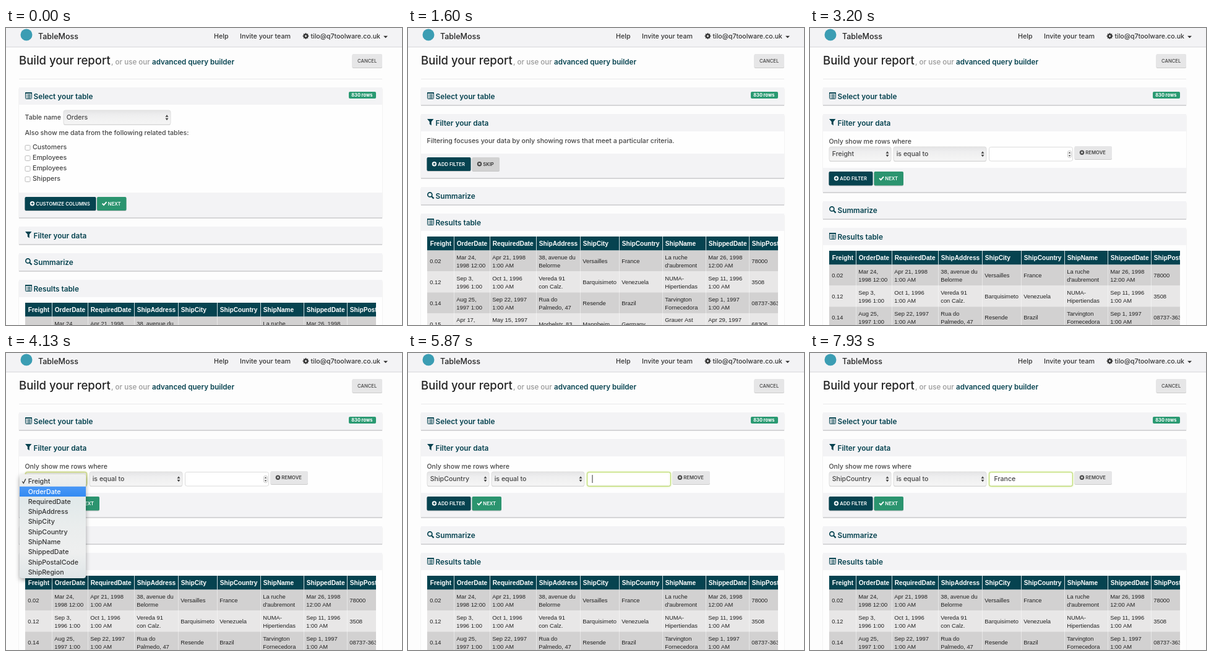
An HTML page with a canvas that plays this animation: 640 by 480 pixels, repeating every 8 s.

```html
<!DOCTYPE html>
<html lang="en">
<head>
<meta charset="utf-8">
<title>Report builder</title>
<style>
  html, body { margin: 0; width: 100%; height: 100%; overflow: hidden; background: #fdfdfd; }
  canvas { display: block; width: 640px; height: 480px; }
</style>
</head>
<body>
<canvas id="stage" width="640" height="480"></canvas>
<script>
const ctx = document.getElementById('stage').getContext('2d');
const LOOP = 8000;
const NAVY = '#064350', GREEN = '#2b946f', INK = '#444', PANEL = '#f3f3f5', WHITE = '#fefefe';
const UI = 'Inter, sans-serif', TABLE = '"Liberation Sans", Arial, sans-serif';

// Timeline in ms
const COLLAPSE = 700, COLLAPSE_TIME = 350, ADD_FILTER = 2880;
const MENU_OPEN = 3680, MENU_CLOSE = 4790, MENU_FADE = 230, PICKED = 5040;
const HOVERS = [4050, 4230, 4330, 4430, 4530];
const INPUT_FOCUS = 5600, TYPE_START = 6300, TYPE_STEP = 170, ANSWER = 'France';

const FIELDS = ['Freight', 'OrderDate', 'RequiredDate', 'ShipAddress', 'ShipCity', 'ShipCountry',
  'ShipName', 'ShippedDate', 'ShipPostalCode', 'ShipRegion'];
const COLUMNS = [31, 74, 132, 207, 278, 341, 411, 481, 551];
const ROWS = [
  ['0.02', 'Mar 24,|1998 12:00', 'Apr 21, 1998|1:00 AM', '38, avenue du|Belorme', 'Versailles', 'France',
    'La ruche|d\'aubremont', 'Mar 26, 1998|12:00 AM', '78000'],
  ['0.12', 'Sep 3,|1996 1:00', 'Oct 1, 1996|1:00 AM', 'Vereda 91|con Calz.', 'Barquisimeto', 'Venezuela',
    'NUMA-|Hipertiendas', 'Sep 11, 1996|1:00 AM', '3508'],
  ['0.14', 'Aug 25,|1997 1:00', 'Sep 22, 1997|1:00 AM', 'Rua do|Palmedo, 47', 'Resende', 'Brazil',
    'Tarvington|Fornecedora', 'Sep 1, 1997|1:00 AM', '08737-363'],
  ['0.15', 'Apr 17,|1997 1:00', 'May 15, 1997|1:00 AM', 'Morbelstr. 83', 'Mannheim', 'Germany',
    'Grauer Ast|Feinkost', 'Apr 29, 1997|1:00 AM', '68306']
];

function text(str, x, y, size = 10.6, color = INK, weight = 500, family = UI) {
  ctx.font = `${weight} ${size}px ${family}`;
  ctx.fillStyle = color;
  ctx.fillText(str, x, y);
}

function rect(x, y, w, h, color) {
  ctx.fillStyle = color;
  ctx.fillRect(x, y, w, h);
}

function box(x, y, w, h, r, fill, stroke) {
  ctx.beginPath();
  ctx.roundRect(x, y, w, h, r);
  if (fill) { ctx.fillStyle = fill; ctx.fill(); }
  if (stroke) { ctx.strokeStyle = stroke; ctx.lineWidth = 1; ctx.stroke(); }
}

function poly(points, color, lineWidth) {
  ctx.beginPath();
  points.forEach(([x, y]) => ctx.lineTo(x, y));
  if (lineWidth) {
    ctx.strokeStyle = color; ctx.lineWidth = lineWidth; ctx.stroke();
  } else {
    ctx.fillStyle = color; ctx.fill();
  }
}

function disc(x, y, r, color) {
  ctx.beginPath();
  ctx.arc(x, y, r, 0, 7);
  ctx.fillStyle = color;
  ctx.fill();
}

function verticalShade(y, h, colors) {
  const shade = ctx.createLinearGradient(0, y, 0, y + h);
  colors.forEach((color, i) => shade.addColorStop(i / (colors.length - 1), color));
  return shade;
}

function clipped(x, y, w, h, paint) {
  ctx.save();
  ctx.beginPath();
  ctx.rect(x, y, w, h);
  ctx.clip();
  paint();
  ctx.restore();
}

const icons = {
  list(x, y) {
    box(x + .5, y + .5, 10, 10, 1, null, NAVY);
    rect(x, y, 11, 2, NAVY);
    for (let i = 0; i < 3; i++) {
      rect(x + 2, y + 3.4 + i * 2.3, 1.2, 1.2, NAVY);
      rect(x + 4, y + 3.4 + i * 2.3, 5, 1.2, NAVY);
    }
  },
  funnel(x, y) {
    poly([[x, y], [x + 10.5, y], [x + 6.8, y + 4.6], [x + 6.8, y + 10.5], [x + 3.8, y + 8.3], [x + 3.8, y + 4.6]], NAVY);
  },
  search(x, y) {
    ctx.beginPath();
    ctx.arc(x + 4.4, y + 4.4, 3.5, 0, 7);
    ctx.strokeStyle = NAVY; ctx.lineWidth = 1.7; ctx.stroke();
    poly([[x + 7, y + 7], [x + 10.6, y + 10.6]], NAVY, 2.2);
  },
  cross(x, y, ink, hole, turn) {
    disc(x, y, 3.7, ink);
    ctx.save();
    ctx.translate(x, y);
    ctx.rotate(turn);
    rect(-2.1, -.6, 4.2, 1.2, hole);
    rect(-.6, -2.1, 1.2, 4.2, hole);
    ctx.restore();
  },
  plus(x, y) { icons.cross(x, y, '#fff', NAVY, 0); },
  times(x, y) { icons.cross(x, y, INK, '#ddd', Math.PI / 4); },
  check(x, y) { poly([[x - 3.4, y], [x - 1, y + 2.4], [x + 3.5, y - 2.5]], '#fff', 1.9); },
  gear(x, y) {
    ctx.save();
    ctx.translate(x, y);
    for (let i = 0; i < 4; i++) { rect(-1, -4.8, 2, 9.6, '#333'); ctx.rotate(Math.PI / 4); }
    ctx.restore();
    disc(x, y, 3.6, '#333');
    disc(x, y, 1.5, PANEL);
  }
};

function button(label, x, y, w, h, fill, ink, icon) {
  box(x - .5, y + 1, w + 1, h, 2, 'rgba(0,0,0,.2)');
  box(x - .5, y, w + 1, h, 2, fill);
  if (icon) icons[icon](x + 11.5, y + h / 2 - .3);
  text(label, x + (icon ? 17.3 : 8), y + h / 2 + 2.5, 7.7, ink, icon ? 600 : 500);
}

function glow(x, y, w, h, color) {
  ctx.save();
  ctx.shadowColor = color;
  ctx.shadowBlur = 3;
  box(x + .5, y + .5, w - 1, h - 1, 3, null, color);
  ctx.restore();
}

function select(label, x, y, w, focused) {
  box(x, y + 1, w, 23, 3, '#cfcfcf');
  box(x, y, w, 23, 3, verticalShade(y, 23, ['#e4e4e5', '#eeeeef', '#f2f2f2', '#f5f5f5']), '#dedede');
  if (focused) glow(x, y, w, 23, '#c8d76c');
  text(label, x + 4.7, y + 15);
  const cx = x + w - 6, cy = y + 11.7;
  poly([[cx - 2.5, cy - 1], [cx + 2.5, cy - 1], [cx, cy - 4.5]], INK);
  poly([[cx - 2.5, cy + 1], [cx + 2.5, cy + 1], [cx, cy + 4.5]], INK);
}

function panel(title, icon, y, height, paintBody) {
  box(20.5, y + 1, 588, height, 2, '#e9e9ea');
  rect(21, y + height - 1, 587, 2, '#d5d5d7');
  rect(21, y, 587, height - 1, WHITE);
  rect(21, y, 587, 28, PANEL);
  icons[icon](31, y + 8);
  text(title, 44.5, y + 18.5, 11.8, NAVY, 600);
  if (paintBody) clipped(21, y + 28, 587, Math.max(0, height - 29), paintBody);
}

function footer(y) { rect(21, y, 587, 40, PANEL); }

function tableChoice() {
  text('Table name', 30.5, 148);
  select('Orders', 93, 133, 173);
  text('Also show me data from the following related tables:', 30.5, 173);
  ['Customers', 'Employees', 'Employees', 'Shippers'].forEach((name, i) => {
    const y = 189 + i * 17;
    box(31, y + .5, 8, 8, 1.5, '#fff', '#bbb');
    text(name, 43, y + 7.3);
  });
  footer(266);
  button('CUSTOMIZE COLUMNS', 31, 273, 114, 22, NAVY, '#fff', 'plus');
  button('NEXT', 147.5, 273, 46.5, 22, GREEN, '#fff', 'check');
}

function filterIntro(y) {
  text('Filtering focuses your data by only showing rows that meet a particular criteria.', 30.5, y + 47);
  footer(y + 64);
  button('ADD FILTER', 31, y + 70, 70, 22, NAVY, '#fff', 'plus');
  button('SKIP', 104, y + 70, 43.5, 22, '#d2d2d2', '#333', 'times');
}

function filterForm(t) {
  const picked = t >= PICKED, focused = t >= INPUT_FOCUS;
  text('Only show me rows where', 30.5, 187);
  select(picked ? 'ShipCountry' : 'Freight', 31, 192, 100, t >= MENU_OPEN && !focused);
  select('is equal to', 135, 192, 150);
  box(289.5, 192.5, 135, 22.5, 3, '#fff', '#dcdcdc');
  if (!picked) {
    box(416.5, 198.5, 6, 11, 2.5, '#fafafa', '#ccc');
    poly([[417.7, 202.5], [421.3, 202.5], [419.5, 200.3]], INK);
    poly([[417.7, 205.5], [421.3, 205.5], [419.5, 207.7]], INK);
  }
  if (focused) {
    glow(289, 192, 136, 24, '#bddd6c');
    const count = Math.min(ANSWER.length, Math.max(0, Math.floor((t - TYPE_START) / TYPE_STEP) + 1));
    const typed = ANSWER.slice(0, count);
    text(typed, 297.5, 207);
    const lastKey = count ? TYPE_START + (count - 1) * TYPE_STEP : INPUT_FOCUS;
    if ((t - lastKey) % 1000 < 500) rect(297.5 + ctx.measureText(typed).width, 197, 1, 13, '#333');
  }
  button('REMOVE', 428, 191, 59.5, 21, '#e6e6e7', INK, 'times');
  footer(226);
  button('ADD FILTER', 31, 232, 70, 22.5, NAVY, '#fff', 'plus');
  button('NEXT', 104, 232, 46.5, 22.5, GREEN, '#fff', 'check');
}

function resultsTable(y) {
  clipped(31, y, 567, 480, () => {
    rect(31, y, 567, 22.5, NAVY);
    ROWS.forEach((row, r) => {
      const top = y + 22.7 + r * 33.8;
      rect(31, top, 567, 33.8, r % 2 ? '#e8e7e7' : '#d2d1d1');
      row.forEach((cell, c) => {
        const lines = cell.split('|');
        lines.forEach((line, i) =>
          text(line, COLUMNS[c] + 4.2, top + (lines.length > 1 ? 14.3 + i * 13.3 : 20.7), 9.4, '#222', 400, TABLE));
      });
    });
    COLUMNS.forEach((x, c) => {
      if (c) {
        rect(x, y, 1, 22.5, '#cddadd');
        rect(x, y + 22.5, 1, 140, 'rgba(255,255,255,.45)');
      }
      text(FIELDS[c], x + 4.7, y + 14.5, 10.15, '#fff', 700, TABLE);
    });
  });
}

function fieldMenu(t) {
  const opacity = 1 - Math.max(0, t - MENU_CLOSE) / MENU_FADE;
  if (t < MENU_OPEN || opacity <= 0) return;
  const hovered = HOVERS.filter(time => t >= time).length;
  ctx.save();
  ctx.globalAlpha = opacity;
  ctx.shadowColor = 'rgba(0,0,0,.35)';
  ctx.shadowBlur = 7;
  ctx.shadowOffsetY = 3;
  // The translucent menu picks up the dark buttons and table head behind it
  box(22, 196, 107, 168, 4, verticalShade(196, 168, ['#f1f1f0', '#e1e9ea', '#eaeded', '#eeefef', '#dfe5e7']));
  ctx.shadowColor = 'transparent';
  FIELDS.forEach((name, i) => {
    const y = 207.5 + i * 16.28;
    if (i === hovered) rect(22, y - 8, 107, 16.3, verticalShade(y - 8, 16, ['#4a98f6', '#338af2']));
    const ink = i === hovered ? '#fff' : '#333';
    if (!i) poly([[26.3, y], [28.3, y + 3], [31.8, y - 4]], ink, 1.3);
    text(name, 35.7, y + 3.8, 10.7, ink);
  });
  ctx.restore();
}

function pageTop() {
  rect(0, 0, 640, 30, PANEL);
  rect(0, 30, 640, 1, '#dedee0');
  rect(0, 31, 640, 1, '#f2f2f3');
  disc(33, 11, 9.5, '#3b9db3');
  text('TableMoss', 52, 18, 12.5, '#222');
  text('Help', 336, 17, 10.7, '#333');
  text('Invite your team', 378, 17, 10.7, '#333');
  icons.gear(484.5, 13);
  text('tilo@q7toolware.co.uk', 492.5, 17, 10.5, '#333');
  poly([[610, 12.7], [617, 12.7], [613.5, 16.3]], '#333');

  text('Build your report', 21, 59, 18.5, '#222');
  text(', or use our', 170, 59, 11.6, '#999');
  text('advanced query builder', 236, 59, 11.6, NAVY, 600);
  button('CANCEL', 560, 42, 47.5, 22, '#e6e6e7', INK);
  rect(21, 82, 587, 1, '#e9e9ea');
}

function draw(t) {
  rect(0, 0, 640, 480, '#fdfdfd');
  pageTop();

  const p = Math.min(1, Math.max(0, (t - COLLAPSE) / COLLAPSE_TIME));
  const eased = p * p * (3 - 2 * p);
  const adding = t >= ADD_FILTER;
  const selectHeight = 29 + 182 * (1 - eased);
  const filterHeight = 29 + (adding ? 98 : 75 * eased);
  const filterY = 96 + selectHeight + 14;
  const summaryY = filterY + filterHeight + 14;
  const resultsY = summaryY + 43;

  panel('Select your table', 'list', 96, selectHeight, tableChoice);
  box(554, 103, 44, 11, 2, '#2a9a72');
  text('830 rows', 558.3, 111.2, 7.4, '#fff', 700);
  panel('Filter your data', 'funnel', filterY, filterHeight, () => adding ? filterForm(t) : filterIntro(filterY));
  panel('Summarize', 'search', summaryY, 29);
  panel('Results table', 'list', resultsY, 400, () => resultsTable(resultsY + 37));
  fieldMenu(t);
}

function tick() {
  draw(performance.now() % LOOP);
  requestAnimationFrame(tick);
}
tick();
</script>
</body>
</html>
```
